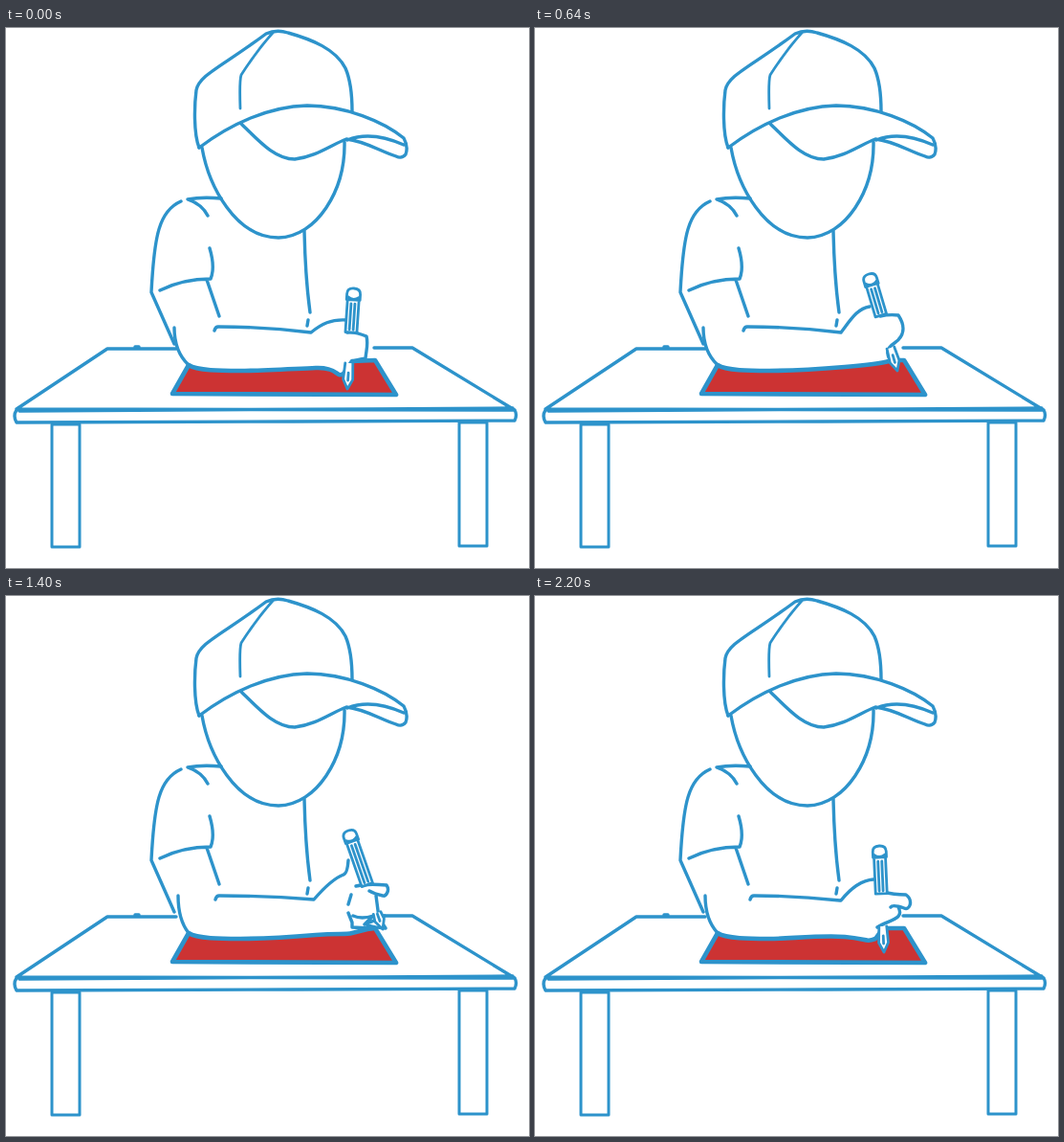
These frames come from a looping animation (547 px wide and 564 px high, 2.24 s). An HTML page:

```html
<!DOCTYPE html>
<html lang="en">
<head>
<meta charset="utf-8">
<title>Drawing at the table</title>
<style>
html, body { margin: 0; width: 100%; height: 100%; overflow: hidden; background: #fff; }
svg { display: block; width: 547px; height: 564px; fill: none; stroke: #2d93cb; stroke-width: 3.4; stroke-linecap: round; stroke-linejoin: round; }
</style>
</head>
<body>
<svg viewBox="0 0 547 564">
  <!-- cap -->
  <path d="M202 125C196 110 197 80 199 65C202 49 225 41 272 6Q283 1 295 5C320 12 345 22 355 42Q362 58 362 87"/>
  <path d="M279 5Q262 24 246 49Q244 55 245 84" stroke-width="2.8"/>
  <path d="M202 125C235 100 275 82 315 81C355 81 395 98 416 115Q421 124 418 132Q414 137 408 134C390 128 375 118 356 116C340 122 325 134 302 137C280 137 262 115 246 100M357 117Q382 107 416 122"/>
  <!-- face and body -->
  <path d="M205 125C212 165 240 219 285 219C325 218 355 170 354 119"/>
  <path d="M225 178Q205 176 190 179Q205 184 211 196M183 181C160 191 155 217 152 276L176 330M161 274Q185 262 214 262Q219 250 213 230M210 263L223 301M312 212Q313 260 318 297M316 305L315 311"/>
  <!-- table -->
  <path d="M178 335H106L11 398M385 334H425L532 399M135 333H139M11 398L532 399M14 400L530 397M11 399Q7 405 11 412L300 411L532 410Q535 404 532 399"/>
  <path d="M48 414H77V542H48ZM474 412H503V541H474Z" stroke-width="3"/>
  <path id="paper" fill="#c33" stroke-width="4.6"/>
  <path id="arm"/>
  <g id="pencil" fill="#fff" stroke-width="2.8"><path id="shaft"/><path id="tip"/></g>
</svg>
<script>
const $ = id => document.getElementById(id);
const LOOP = 2240;

// Moments at which the picture steps on.
const steps = [0, 160, 240, 280, 320, 400, 480, 560, 640,
  720, 760, 800, 840, 880, 960, 1040, 1080, 1120, 1160, 1200,
  1280, 1320, 1360, 1400, 1480, 1560, 1640, 1720, 1800,
  1880, 1960, 2040, 2120, 2200];

// elbow x, sleeve end of the forearm, wrist, lower edge of the hand, hand outline
const hand = (elbow, ax, ay, wx, wy, edge, outline) =>
  `M191 352C200 358 225 358 245 358S${edge}|M${elbow} 313Q${elbow} 338 191 352` +
  `M${ax - 4} ${ay + 4}Q${ax - 3} ${ay} ${ax} ${ay}Q272 ${ay} ${wx} ${wy}${outline}`;

const hands = {
  down: hand(176, 222, 312, 319, 318, '300 356 324 355S345 366 353 361L362 348',
    'M319 318L319 318M319 318C330 309 340 304 356 305M357 318Q365 317 377 322C379 330 377 335 376 345Q370 346 363 348'),
  left: hand(176, 222, 312, 317, 317, '300 356 324 354S352 351 358 346L362 346',
    'M313 317L320 309M317 318C315 303 328 293 341 293M349 300Q358 299 368 299C378 312 377 318 368 324Q352 334 358 346'),
  right: hand(176, 222, 312, 320, 318, '300 356 324 354S360 351 370 348L374 347',
    'M319 318L319 318M320 318C330 305 337 293 350 291M361 301Q370 299 380 300C388 312 386 322 376 329Q365 336 371 346'),
  upright: hand(176, 222, 312, 320, 318, '300 356 324 355S340 362 348 359L358 347',
    'M319 318L319 318M320 318C330 307 335 302 347 302M354 313Q358 317 364 316C370 325 366 335 362 342Q355 347 348 346'),
  lifted: hand(180, 223, 313, 322, 317, '300 356 324 354S355 354 362 352L378 348',
    'C335 302 345 294 353 291Q357 290 358 276M366 303Q378 300 398 302C402 308 397 314 394 313Q385 311 380 308M361 312L358 322M358 331L362 341V346L380 347M363 334Q372 338 384 334L375 343Q388 338 396 334M387 313L390 336L397 347Q388 347 376 343'),
  fist: hand(179, 227, 311, 332, 315, '300 356 324 354S355 354 364 351L378 348',
    'M308 317L313 313M322 316C330 308 338 300 345 292M360 292V304M359 309L358 318M358 326L361 335M362 340L364 346M362 301Q374 299 381 301C384 308 380 314 376 313L368 314M374 314Q382 317 381 324Q378 330 371 330M372 331Q378 341 370 345L363 346'),
  settle: hand(178, 229, 313, 319, 318, '300 354 324 356S345 362 356 358L364 347',
    'M320 318C328 308 340 297 354 296M364 309Q375 312 388 312C396 318 392 329 386 326Q374 322 372 325M380 325C387 338 370 338 358 346')
};

// end x y, point x y, visible shaft, visible point
const pens = {
  down: '364 272 357 377 46 27', left: '338 256 369 357 46 26',
  right: '349 257 379 358 45 25', upright: '352 267 354 374 48 28',
  lifted: '358 245 394 348 60 18', swing: '423 262 352 318 60 22',
  fist: '389 285 318 276 50 24', turn: '387 286 316 284 50 24',
  rise: '388 238 364 325 60 24', settle: '360 261 365 372 50 27'
};

const writing = [[80, 'down'], [400, 'left'], [640, 'right'], [960, 'upright'],
  [1120, 'left'], [1200, 'down'], [1400, 'lifted']];
const handKeys = [...writing, [1720, 'fist'], [1800, 'fist'], [2200, 'settle']];
const penKeys = [...writing, [1560, 'swing'], [1720, 'fist'], [1800, 'turn'], [2040, 'rise'], [2200, 'settle']];

const number = /[\d.]+/g;
const form = s => s.replace(number, '#');

// Blends the numbers of two strings; strings of different form switch halfway.
function mix(a, b, u) {
  if (form(a) !== form(b)) return u < .5 ? a : b;
  const to = b.match(number);
  let i = 0;
  return a.replace(number, n => +(+n + (to[i++] - n) * u).toFixed(2));
}

function pose(keys, shapes, t) {
  const next = keys.findIndex(k => k[0] >= t);
  if (next < 1) return shapes[keys[0][1]];
  const [[t0, a], [t1, b]] = [keys[next - 1], keys[next]];
  return mix(shapes[a], shapes[b], (t - t0) / (t1 - t0));
}

function draw(t) {
  const [edge, arm] = pose(handKeys, hands, t).split('|');
  $('paper').setAttribute('d', edge + 'L386 347L408 383L174 382Z');
  $('arm').setAttribute('d', arm);

  const [x, y, px, py, s, k] = pose(penKeys, pens, t).split(' ').map(Number);
  const len = Math.hypot(px - x, py - y);
  const turn = Math.atan2(py - y, px - x) * 180 / Math.PI - 90;
  $('pencil').setAttribute('transform', `translate(${x} ${y}) rotate(${turn})`);
  $('shaft').setAttribute('d', `M-6 10V${s}H6V10M-2 16V${s - 3}M2 16V${s - 3}M-7 12V6Q-7 0 0 0T7 6V12ZM-6 9Q0 14 6 9`);
  $('tip').setAttribute('d', `M-4 ${len - k}L-5 ${len - 10}L0 ${len}L5 ${len - 10}L4 ${len - k}M0 ${len - 17}V${len - 9}`);
}

function tick() {
  const now = performance.now() % LOOP;
  draw(steps.filter(s => s <= now).pop());
  requestAnimationFrame(tick);
}
tick();
</script>
</body>
</html>
```
